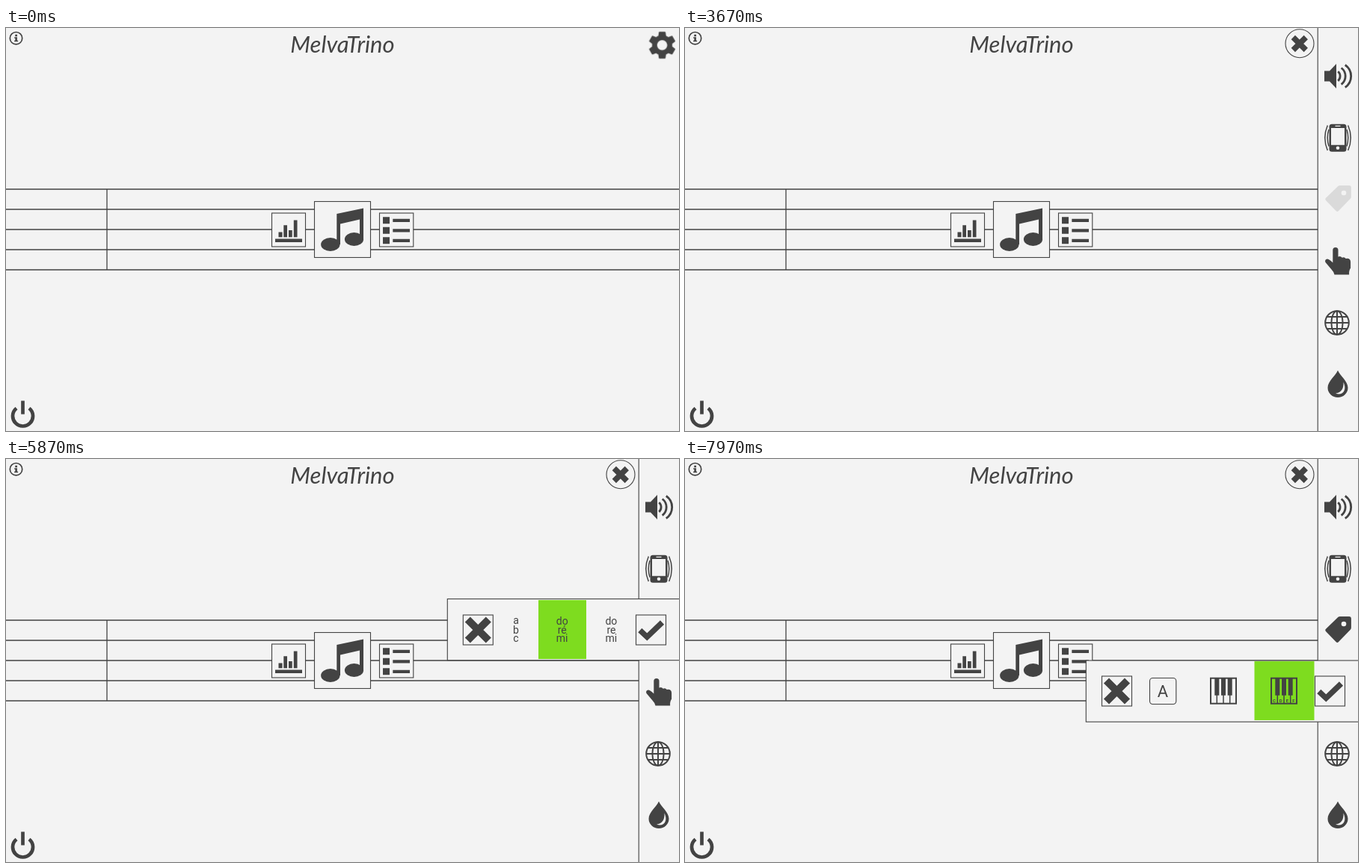
An HTML page that plays this animation: 900 by 540 pixels, repeating every 8000 ms.

```html
<!DOCTYPE html>
<html lang="en">
<head>
<meta charset="utf-8">
<title>Music menu</title>
<style>
:root { --ink: #434343; --bg: #f3f3f3; --pick: #7edc1f; --out: cubic-bezier(.16, 1, .3, 1); }
html, body { margin: 0; width: 100%; height: 100%; overflow: hidden; background: var(--bg); }
svg { display: block; width: 900px; height: 540px; fill: var(--ink); }
.line { fill: none; stroke: var(--ink); }
.thin { fill: var(--bg); stroke: var(--ink); stroke-width: 1.1; }
.bg { fill: var(--bg); }
.pick { fill: var(--pick); }
.title { font: italic 31px Lato, sans-serif; text-anchor: middle; }
.notes { font: 14px Roboto, sans-serif; text-anchor: middle; }
.key { font: 22px Roboto, sans-serif; text-anchor: middle; }
.tiny { font: bold 6px Roboto, sans-serif; text-anchor: middle; }

/* every animation shares one 8 s clock */
.a { animation: 8s linear infinite; }
.gear { animation-name: gear; }
.side { animation-name: side; }
.close { animation-name: close; }
.i0 { animation-name: in0; }
.i1 { animation-name: in1; }
.i2 { animation-name: in2; }
.i3 { animation-name: in3; }
.i4 { animation-name: in4; }
.i5 { animation-name: in5; }
.phone { animation-name: phone; }
.buzz { animation-name: buzz; }
.tag { animation-name: tag; }
.hand { animation-name: hand; }
.names { animation-name: names; }
.inputs { animation-name: inputs; }
.ok { animation-name: ok; }
.p1 { animation-name: p1; }
.p2 { animation-name: p2; }
.p3 { animation-name: p3; }

@keyframes gear { 0%, 15% { opacity: 1 } 16.6%, 20% { opacity: .12 } 20.01%, to { opacity: 0 } }
@keyframes side { 0%, 20.06% { transform: translateX(55px); animation-timing-function: var(--out) } 24.44%, to { transform: none } }
@keyframes close { 0%, 20% { opacity: 0 } 20.01% { opacity: .12 } 21.6%, to { opacity: 1 } }

@keyframes in0 { 0%, 20.06% { transform: translateX(50px); opacity: 0; animation-timing-function: var(--out) } 24.44%, to { transform: none; opacity: 1 } }
@keyframes in1 { 0%, 20.81% { transform: translateX(50px); opacity: 0; animation-timing-function: var(--out) } 25.19%, to { transform: none; opacity: 1 } }
@keyframes in2 { 0%, 21.56% { transform: translateX(50px); opacity: 0; animation-timing-function: var(--out) } 25.94%, to { transform: none; opacity: 1 } }
@keyframes in3 { 0%, 22.31% { transform: translateX(50px); opacity: 0; animation-timing-function: var(--out) } 26.69%, to { transform: none; opacity: 1 } }
@keyframes in4 { 0%, 23.06% { transform: translateX(50px); opacity: 0; animation-timing-function: var(--out) } 27.44%, to { transform: none; opacity: 1 } }
@keyframes in5 { 0%, 23.81% { transform: translateX(50px); opacity: 0; animation-timing-function: var(--out) } 28.19%, to { transform: none; opacity: 1 } }

@keyframes phone { 0%, 32.5% { opacity: 1 } 34.1%, 36.6% { opacity: .12 } 38.2%, to { opacity: 1 } }
@keyframes buzz { 0%, 36.6% { opacity: 0 } 36.61%, to { opacity: 1 } }
@keyframes tag { 0%, 41.25% { opacity: 1 } 43.4%, 45.87% { opacity: .13 } 47.5%, to { opacity: 1 } }
@keyframes hand { 0%, 87.1% { opacity: 1 } 88.75%, 91.25% { opacity: .12 } 92.9%, to { opacity: 1 } }

@keyframes names {
  0%, 45.87% { transform: translateX(312px); animation-timing-function: var(--out) }
  50.4%, 82.5% { transform: none; animation-timing-function: var(--out) }
  87.1%, to { transform: translateX(312px) }
}
@keyframes inputs { 0%, 91.25% { transform: translateX(366px); animation-timing-function: var(--out) } 95.8%, to { transform: none } }
@keyframes ok { 0%, 77% { opacity: 1 } 78.75%, 82.5% { opacity: .12 } 84.2%, to { opacity: 1 } }
@keyframes p1 { 0%, 67.1% { opacity: 0 } 68.7%, 70.6% { opacity: 1 } 72.2%, to { opacity: 0 } }
@keyframes p2 { 0%, 70.6% { opacity: 0 } 72.2%, to { opacity: 1 } }
@keyframes p3 { 0%, 67.1% { opacity: 1 } 68.7%, to { opacity: 0 } }
</style>
</head>
<body>
<svg viewBox="0 0 900 540">
  <defs>
    <g id="cross">
      <rect class="thin" x="-20" y="-20" width="40" height="40"/>
      <path class="line" stroke-width="10" d="M-14-14 14 14M14-14-14 14"/>
    </g>
    <g id="check">
      <rect class="thin" x="-20" y="-20" width="40" height="40"/>
      <path class="line" stroke-width="7.4" d="M-14.7 .5-5.2 9.5 15-10"/>
    </g>
    <g id="piano">
      <rect class="line" stroke-width="2" x="-17" y="-17" width="34" height="34"/>
      <path class="line" stroke-width="1.5" d="M-8.7 4V17M0 4V17M8.7 4V17"/>
      <path d="M-11.7-17h6V6h-6zM-3-17h6V6h-6zM5.7-17h6V6h-6z"/>
    </g>
  </defs>

  <!-- home screen -->
  <path class="line" stroke-width="1.3" d="M0 216H900M0 243H900M0 270H900M0 297H900M0 324H900M135 216V324"/>
  <text class="title" x="450" y="33">MelvaTrino</text>
  <circle class="line" stroke-width="1.7" cx="13.5" cy="13.7" r="8.2"/>
  <path d="M12.2 8.8h2.8v2.4h-2.8zM11.2 12.2h3.7v4.6h1.2v1.5h-5v-1.5h1.2v-3.1h-1.1z"/>
  <path class="line" stroke-width="4.7" d="M14 509.5A13.5 13.5 0 1 0 31 509.5M22.5 499.5V517.5"/>

  <rect class="thin" x="355.5" y="248" width="45" height="45"/>
  <path d="M360 282.5h36v4.5h-36zM364.5 273.5h5v6.8h-5zM371.3 264.3h4.7v16h-4.7zM378 271h4.7v9.3H378zM384.8 257.5h4.7v22.8h-4.7z"/>
  <rect class="thin" x="412.5" y="232.5" width="75" height="75"/>
  <path d="M442.3 249 478 241.5V283H473V256.5L447 262.5V290H442.3z"/>
  <ellipse cx="433.8" cy="290" rx="12.7" ry="9"/>
  <ellipse cx="465.5" cy="283" rx="12.6" ry="9"/>
  <rect class="thin" x="499.5" y="248" width="45.3" height="45"/>
  <path d="M504 253.3h9v9h-9zM504 266.7h9v9h-9zM504 280.2h9v9h-9zM517.3 255.7H540v4.3h-22.7zM517.3 269.2H540v4.3h-22.7zM517.3 282.7H540v4.3h-22.7z"/>

  <g class="a gear">
    <path transform="translate(855 .5) scale(1.875)" d="M19.14 12.94c.04-.3.06-.61.06-.94 0-.32-.02-.64-.07-.94l2.03-1.58c.18-.14.23-.41.12-.61l-1.92-3.32c-.12-.22-.37-.29-.59-.22l-2.39.96c-.5-.38-1.03-.7-1.62-.94l-.36-2.54c-.04-.24-.24-.41-.48-.41h-3.84c-.24 0-.43.17-.47.41l-.36 2.54c-.59.24-1.13.57-1.62.94l-2.39-.96c-.22-.08-.47 0-.59.22L2.74 8.87c-.12.21-.08.47.12.61l2.03 1.58c-.05.3-.09.63-.09.94s.02.64.07.94l-2.03 1.58c-.18.14-.23.41-.12.61l1.92 3.32c.12.22.37.29.59.22l2.39-.96c.5.38 1.03.7 1.62.94l.36 2.54c.05.24.24.41.48.41h3.84c.24 0 .44-.17.47-.41l.36-2.54c.59-.24 1.13-.56 1.62-.94l2.39.96c.22.08.47 0 .59-.22l1.92-3.32c.12-.22.07-.47-.12-.61zM12 15.6c-1.98 0-3.6-1.62-3.6-3.6s1.62-3.6 3.6-3.6 3.6 1.62 3.6 3.6-1.62 3.6-3.6 3.6z"/>
  </g>

  <!-- settings drawer -->
  <g class="a side">
    <rect class="thin" x="846.2" y="-2" width="60" height="544"/>
    <g class="a close">
      <circle class="thin" cx="822" cy="20.8" r="19"/>
      <path class="line" stroke-width="7.5" d="M813.3 12.5 830.3 29.5M830.3 12.5 813.3 29.5"/>
    </g>
  </g>
  <g class="a i0">
    <path d="M855 57.5h7l9-9.5v33l-9-9.5h-7z"/>
    <path class="line" stroke-width="2.8" d="M873.3 58.3A8.5 8.5 0 0 1 873.3 70.9M877.7 53.5A14 14 0 0 1 877.7 75.7M882.8 49.5A18.4 18.4 0 0 1 882.8 79.7"/>
  </g>
  <g class="a i1">
    <g class="a phone">
      <rect x="861.5" y="128.7" width="23" height="37" rx="3.5"/>
      <path class="bg" d="M864 134h18v22.7h-18zM869.5 130.8h7v1.2h-7z"/>
      <circle class="bg" cx="873" cy="160.8" r="2.3"/>
      <path class="line a buzz" stroke-width="1.5" d="M859.3 130.5Q852.2 147 859.3 164M861 136Q857.4 147 861 158.5M886.7 130.5Q893.8 147 886.7 164M885 136Q888.6 147 885 158.5"/>
    </g>
  </g>
  <g class="a i2">
    <g class="a tag">
      <path d="M873.5 211.8q1-.9 2.5-.9h12q2.9 0 2.9 2.9V226q0 1.7-1.1 2.8L873.8 245.3q-1.5 1.5-3 0L857 231q-1.5-1.7 0-3.2z"/>
      <circle class="bg" cx="881" cy="221" r="3.3"/>
    </g>
  </g>
  <g class="a i3">
    <path class="a hand" d="M866.3 297.5a3.6 3.6 0 0 1 7.2 0V306.5q3-1.5 5.3 1.2q3-1.2 5 1.2q6-1 6.3 4.5v8q-2 3-2 5.5v3.5H868.5q-1-4-4-7l-8-9.5q-1.5-3.5 2-4.5q3 0 7.8 5z"/>
  </g>
  <g class="a i4">
    <g class="line" stroke-width="2">
      <circle cx="872" cy="395" r="15.8"/>
      <ellipse cx="872" cy="395" rx="7.6" ry="15.8"/>
      <path d="M872 379V411M856 395H888M858.5 387H885.5M858.5 403H885.5"/>
    </g>
  </g>
  <g class="a i5">
    <path d="M873 458.7C876 466 886.5 473 886.5 482a13.5 13 0 0 1-27 0C859.5 473 870 466 873 458.7z"/>
    <path class="bg" d="M880.5 474.5C885.5 485 880 493 870 489.7C878 488.5 881 483 880.5 474.5z"/>
  </g>

  <!-- note name choices -->
  <g class="a names">
    <rect class="thin" x="590.3" y="187.5" width="330" height="82.2"/>
    <rect class="pick a p1" x="650" y="189" width="62" height="79"/>
    <rect class="pick a p2" x="712" y="189" width="64" height="79"/>
    <rect class="pick a p3" x="778" y="189" width="63.5" height="79"/>
    <use href="#cross" x="631.3" y="229"/>
    <g class="notes">
      <text><tspan x="682" y="220.5">a</tspan><tspan x="682" y="234">b</tspan><tspan x="682" y="244.5">c</tspan></text>
      <text><tspan x="743.7" y="222.3">do</tspan><tspan x="743.7" y="234">ré</tspan><tspan x="743.7" y="245">mi</tspan></text>
      <text><tspan x="809.4" y="222.3">do</tspan><tspan x="809.4" y="234">re</tspan><tspan x="809.4" y="245">mi</tspan></text>
    </g>
    <g class="a ok"><use href="#check" x="862.5" y="229"/></g>
  </g>

  <!-- input choices -->
  <g class="a inputs">
    <rect class="thin" x="536.3" y="270" width="380" height="82.2"/>
    <rect class="pick" x="761.5" y="271" width="80" height="79"/>
    <use href="#cross" x="577.5" y="311"/>
    <rect class="thin" x="621.5" y="293.5" width="35.3" height="35" rx="4"/>
    <text class="key" x="639" y="319">A</text>
    <use href="#piano" x="720" y="310.7"/>
    <use href="#piano" x="801" y="310.7"/>
    <text class="tiny"><tspan x="788" y="326">C</tspan><tspan x="796.6" y="326">D</tspan><tspan x="805.4" y="326">E</tspan><tspan x="814" y="326">F</tspan></text>
    <use href="#check" x="862.5" y="311"/>
  </g>
</svg>
</body>
</html>
```
